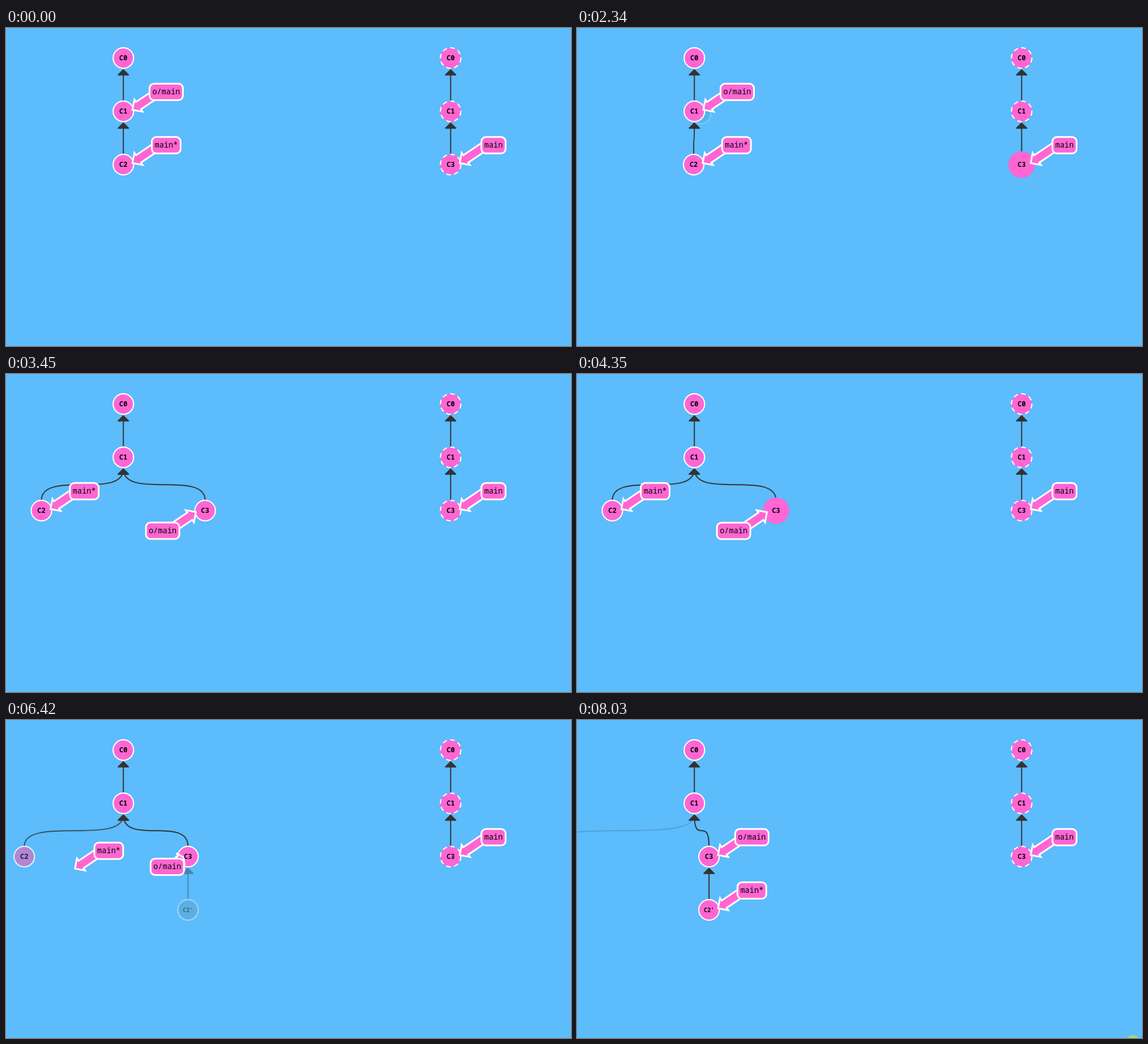
Write an HTML page that moves like this. It is 998 px wide and 561 px high and loops after 8160 ms.

```html
<!DOCTYPE html>
<html lang="en">
<head>
<meta charset="utf-8">
<title>Commit graph</title>
<style>
  html, body { margin: 0; width: 100%; height: 100%; overflow: hidden; background: #5cbcfc; }
  svg { display: block; width: 100%; height: 100%; }
  text { font-family: "Noto Sans Mono", monospace; text-anchor: middle; fill: #000; }
  .commit { font-weight: 700; }
  .edge { fill: #333; stroke: #333; stroke-width: 2; stroke-linejoin: round; }
  .tag { fill: #ff66d3; stroke: #fff; stroke-width: 3; }
</style>
</head>
<body>
<svg id="stage" viewBox="0 0 998 561"></svg>
<script>
const LOOP = 8160, STEP = 67.7;
const PINK = [255, 102, 211], TEAL = [36, 178, 178], WHITE = [255, 255, 255];
const LEFT = 207.3, RIGHT = 785.4, ROWS = [53, 147, 241, 335];
const RADIUS = 18.1, STROKE = 2.1, FAINT = 0.2;

// Each scene: first visible change, and the moment its easing starts counting.
const SCENES = [
  [1390, 1385], // highlight remote C3
  [2280, 2220], // fetch C3
  [3100, 3050], // move o/main
  [3790, 3780], // highlight local C3
  [4620, 4610], // highlight C2
  [5450, 5440], // copy C2
  [6280, 6276]  // move main and settle
];
const CURSOR_AT = 8030;

const stage = document.getElementById('stage');
const mix = (a, b, p) => a + (b - a) * p;
const mixPoint = (a, b, p) => a.map((v, i) => mix(v, b[i], p));
const rgb = (a, b, p) => `rgb(${mixPoint(a, b, p).map(Math.round)})`;

function easeInOut(n) {
  if (n <= 0 || n >= 1) return n <= 0 ? 0 : 1;
  const q = 0.48 - n / 1.04, root = Math.sqrt(0.1734 + q * q);
  const t = Math.cbrt(root - q) + Math.cbrt(-root - q) + 0.5;
  return (1 - t) * 3 * t * t + t ** 3;
}

function bounce(n) {
  const s = 7.5625, p = 2.75;
  if (n < 1 / p) return s * n * n;
  if (n < 2 / p) return s * (n - 1.5 / p) ** 2 + 0.75;
  if (n < 2.5 / p) return s * (n - 2.25 / p) ** 2 + 0.9375;
  return n >= 1 ? 1 : s * (n - 2.625 / p) ** 2 + 0.984375;
}

function set(el, attrs) {
  for (const key in attrs) el.setAttribute(key, attrs[key]);
}

function add(tag, attrs = {}, content = '') {
  const el = document.createElementNS('http://www.w3.org/2000/svg', tag);
  set(el, attrs);
  el.textContent = content;
  return stage.appendChild(el);
}

function makeEdge() {
  const path = add('path', { class: 'edge' });
  return (tail, head, opacity = 1) => {
    const bend = 54, wing = 9;
    const [tx, hx] = [tail[0], head[0]];
    const ty = tail[1] - RADIUS, hy = head[1] + RADIUS * 1.15;
    const low = `${tx},${ty - bend}`, high = `${hx},${hy + bend}`;
    set(path, {
      d: `M${tx},${ty} C${low} ${high} ${hx},${hy}` +
         ` l${-wing},${wing} h${2 * wing} L${hx},${hy} C${high} ${low} ${tx},${ty}`,
      opacity
    });
  };
}

function makeNode(name) {
  const circle = add('circle', { r: RADIUS });
  const size = name.length > 2 ? 10 : 12;
  const text = add('text', { class: 'commit', 'font-size': size }, name);
  return ([x, y], { opacity = 1, orphan = 0, glow = 0, dashed = false } = {}) => {
    set(circle, {
      cx: x, cy: y, opacity,
      fill: rgb(PINK, TEAL, orphan),
      stroke: rgb(WHITE, PINK, glow),
      'stroke-width': STROKE * (1 + 4 * glow),
      'stroke-dasharray': dashed ? '8 6' : 'none'
    });
    set(text, { x, y: y + size * 0.36, opacity });
  };
}

// Arrow outline as [distance from tip, distance from axis].
const ARROW = [[0, 0], [13, -13], [13, -7.8], [58, -7.8], [58, 7.8], [13, 7.8], [13, 13]];
const TILT = -34 * Math.PI / 180, COS = Math.cos(TILT), SIN = Math.sin(TILT);

// Side 1 puts the label at the upper right of its commit, -1 at the lower left.
function makeLabel(name) {
  const arrow = add('polygon', { class: 'tag' });
  const width = name.length * 8.17 + 10, height = 29;
  const box = add('rect', { class: 'tag', width, height, rx: 8 });
  const text = add('text', { 'font-size': 13.65 }, name);
  return ([x, y], side = 1) => {
    const cx = x + 75.3 * side + 0.4, cy = y - 35 * side + 0.8;
    const points = ARROW.map(([u, v]) => [
      x + side * (16 + u * COS) - v * SIN,
      y + side * (u * SIN - 2.8) + v * COS
    ]);
    set(arrow, { points: points.join(' ') });
    set(box, { x: cx - width / 2, y: cy - height / 2 });
    set(text, { x: cx, y: cy + 4.5 });
  };
}

const edges = {};
for (const key of ['c1', 'c2', 'c3', 'copy', 'r1', 'r3']) edges[key] = makeEdge();
const nodes = {
  copy: makeNode("C2'"), c2: makeNode('C2'), c3: makeNode('C3'), c0: makeNode('C0'), c1: makeNode('C1'),
  r0: makeNode('C0'), r1: makeNode('C1'), r3: makeNode('C3')
};
const labels = { origin: makeLabel('o/main'), main: makeLabel('main*'), remote: makeLabel('main') };
const cursor = add('circle', { cx: 981.7, cy: 569.7, r: 13.6, fill: '#a6d97b' });

const root = ROWS.map(y => [LEFT, y]);
const remote = ROWS.map(y => [RIGHT, y]);

edges.c1(root[1], root[0]);
edges.r1(remote[1], remote[0]);
edges.r3(remote[2], remote[1]);
nodes.c0(root[0]);
nodes.c1(root[1]);
nodes.r0(remote[0], { dashed: true });
nodes.r1(remote[1], { dashed: true });
labels.remote(remote[2]);

function draw(time) {
  const scene = SCENES.filter(([first]) => first <= time).length - 1;
  const first = scene < 0 ? 0 : SCENES[scene][0];
  const now = first + Math.floor((time - first) / STEP) * STEP;
  const progress = (i, duration, ease = easeInOut) =>
    i > scene ? 0 : ease(Math.min(1, (now - SCENES[i][1]) / duration));

  const fetched = progress(1, 400), fetchDrop = progress(1, 800, bounce);
  const moved = progress(2, 400);
  const copied = progress(5, 400), copyDrop = progress(5, 800, bounce);
  const settled = progress(6, 400);

  const SHIFT = 118.4, FORK = 470;
  const mainX = LEFT - 26.5 * fetched - SHIFT * moved;
  const c2 = [mainX - SHIFT * settled, ROWS[2]];
  const c3 = [FORK - SHIFT * (moved + settled), ROWS[2]];
  const copy = [c3[0], ROWS[3]];
  const copyEnd = [FORK - 2 * SHIFT, ROWS[3]];
  const originEnd = [FORK - SHIFT * (1 + settled), ROWS[2]];

  const c3Opacity = scene < 1 ? 0 : mix(FAINT, 1, moved);
  const copyOpacity = scene < 5 ? 0 : mix(FAINT, 1, settled);
  const c2Opacity = mix(1, FAINT, settled);

  edges.c2(c2, root[1], c2Opacity);
  edges.c3(mixPoint(root[1], c3, fetched), root[1], c3Opacity * fetched);
  edges.copy(mixPoint(c3, copy, copied), c3, copyOpacity * copied);

  nodes.c2(c2, { opacity: c2Opacity, orphan: settled, glow: progress(4, 600) * (1 - copied) });
  nodes.c3(mixPoint(root[1], c3, fetchDrop),
    { opacity: c3Opacity, orphan: 1 - moved, glow: progress(3, 600) * (1 - copied) });
  nodes.copy(mixPoint(c3, copy, copyDrop), { opacity: copyOpacity, orphan: 1 - settled });
  nodes.r3(remote[2], { glow: progress(0, 600) * (1 - moved), dashed: scene < 0 || scene > 1 });

  labels.main(mixPoint([mainX, ROWS[2]], copyEnd, settled));
  labels.origin(mixPoint(root[1], originEnd, moved), 1 - 2 * moved + 2 * settled);
  cursor.setAttribute('visibility', time >= CURSOR_AT ? 'visible' : 'hidden');
}

function tick() {
  draw(performance.now() % LOOP);
  requestAnimationFrame(tick);
}
tick();
</script>
</body>
</html>
```
